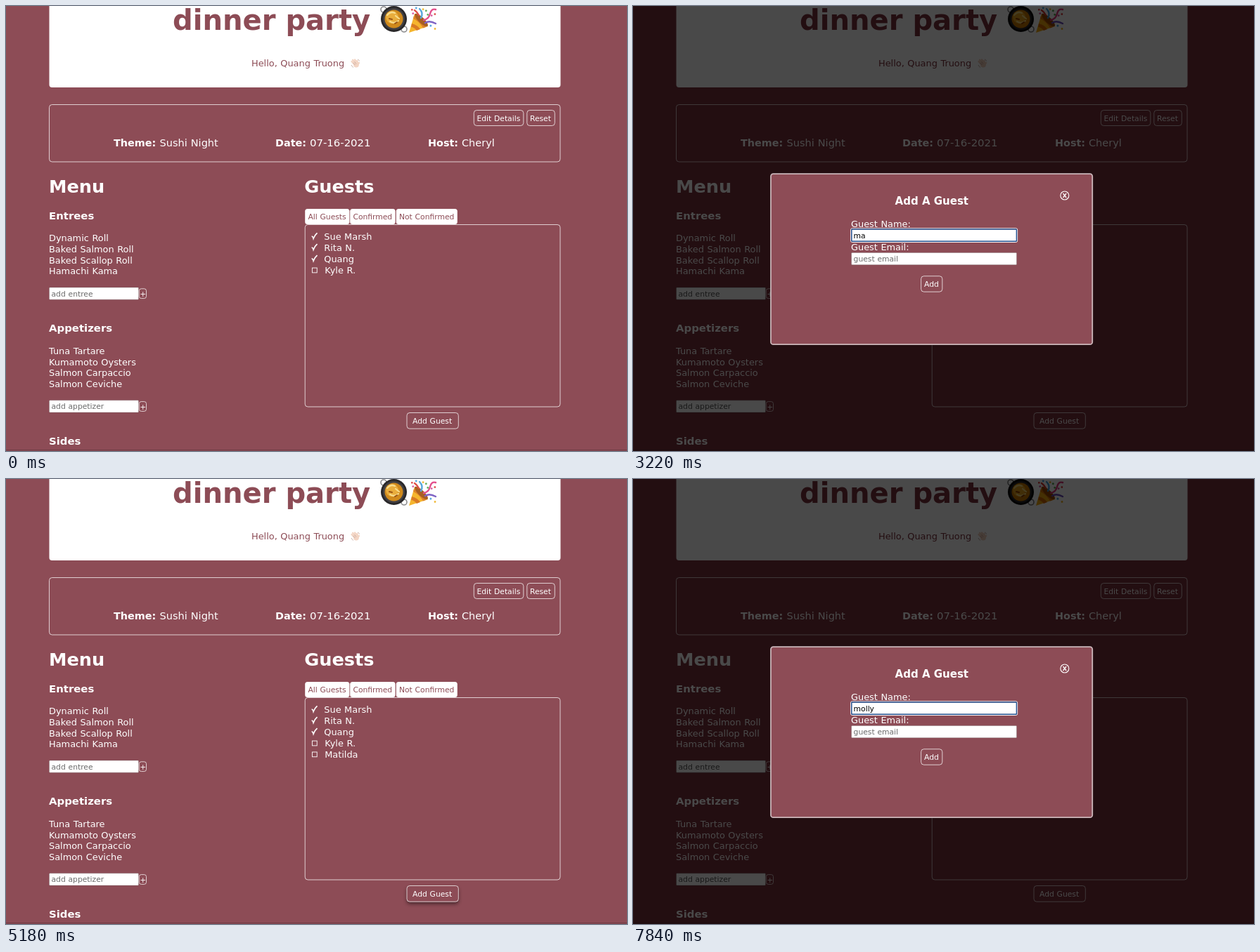
These frames come from a looping animation (883x634 px, 8000 ms). An HTML page:

```html
<!DOCTYPE html>
<html lang="en">
<head>
<meta charset="utf-8">
<title>Dinner party planner</title>
<style>
  html, body { margin: 0; width: 100%; height: 100%; overflow: hidden; background: #8d4c56; }
  svg { display: block; width: 883px; height: 634px; }
  text { font-family: "DejaVu Sans", Verdana, sans-serif; fill: #fff; word-spacing: .034em; white-space: pre; }
  .b { font-weight: bold; word-spacing: 0; }
  .rose { fill: #8d4c56; }
  .hint { fill: #6c6c6c; }
  .ink { fill: #000; }
  .line { fill: none; stroke: #fff; stroke-opacity: .72; }
  .field { fill: #fff; stroke: #6f6468; stroke-opacity: .5; stroke-width: .7; }
  .hover { filter: drop-shadow(0 3px 2.5px rgba(0, 0, 0, .45)); }
  .hover rect { fill: #8d4c56; }
  .dim { filter: url(#dim); }
</style>
</head>
<body>
<svg viewBox="0 0 883 634">
  <filter id="dim" filterUnits="userSpaceOnUse" x="0" y="0" width="883" height="634" color-interpolation-filters="sRGB">
    <feComponentTransfer>
      <feFuncR type="linear" slope=".33" intercept="-.043"/>
      <feFuncG type="linear" slope=".33" intercept="-.043"/>
      <feFuncB type="linear" slope=".33" intercept="-.043"/>
    </feComponentTransfer>
  </filter>
  <g id="page">
    <rect width="883" height="634" fill="#8d4c56"/>
    <rect x="61.5" y="-12" width="727" height="128" rx="4" fill="#fff"/>
    <g id="pan">
      <circle cx="537" cy="5" r="4" fill="none" stroke="#8b8b8d" stroke-width="1.6"/>
      <circle cx="566" cy="33" r="4" fill="none" stroke="#8b8b8d" stroke-width="1.6"/>
      <circle cx="551.5" cy="18.5" r="18.5" fill="#29282a"/>
      <circle cx="551.5" cy="18.5" r="15.5" fill="#434144"/>
      <circle cx="551.5" cy="18.5" r="13" fill="#d08a1c"/>
      <circle cx="549" cy="16" r="9" fill="#e9ad3c"/>
      <path d="M542 13q5-6 11-3M546 22q6 4 12-1M554 14l5 4" fill="none" stroke="#f8dc8b" stroke-width="2.2" stroke-linecap="round"/>
      <path d="M545 18l4 1M553 25l3-2" stroke="#9b5515" stroke-width="2" stroke-linecap="round"/>
    </g>
    <g id="popper">
      <path d="M573 38L581 11Q593 16 600 29Z" fill="#f5b52e"/>
      <path d="M577 25Q585 27 589 33L584 35Q580 30 576 30Z" fill="#d97a24"/>
      <path d="M580 14Q592 19 597 30L593 31.500Q588 22 579 18Z" fill="#df8428"/>
      <ellipse cx="590.500" cy="20" rx="4" ry="12.500" transform="rotate(-46 590.500 20)" fill="#a85f23"/>
      <g fill="none" stroke-width="2.400" stroke-linecap="round">
        <path d="M590 17Q594 10 588 4" stroke="#5aa9dd"/>
        <path d="M594 20Q601 19 603 11T611 5" stroke="#e3508c"/>
        <path d="M596 24Q602 20 611 25" stroke="#7e63c4"/>
        <path d="M587 13Q584 8 581 6" stroke="#df5049"/>
      </g>
      <g id="confetti"></g>
    </g>
    <g id="wave">
      <g stroke="#f3d5c4" stroke-linecap="round" stroke-width="2.300">
        <path d="M496 84L491.500 79M497 82L493 76.800M499 81L496 76.500M500 81L499.300 78M498 86L502 81"/>
      </g>
      <circle cx="498" cy="83.500" r="3.900" fill="#f3d5c4"/>
      <path d="M493.500 81l3 3M495.500 79.500l2.500 3M491 84q1 2.500 3 3.500M500 76q2 .5 2.500 2.500" fill="none" stroke="#c0a49c" stroke-width=".8"/>
    </g>
    <rect class="line" x="61.5" y="140.500" width="726.500" height="81.500" rx="4"/>
    <rect class="line" x="425.200" y="311.500" width="362.800" height="259.500" rx="4"/>
  </g>
  <g id="modal">
    <rect x="196" y="239.200" width="457.200" height="243" rx="3.500" fill="#8d4c56" stroke="#cbb6ba" stroke-width="1.800"/>
    <circle cx="613.800" cy="270" r="6" fill="none" stroke="#fff" stroke-width="1.100"/>
    <path d="M611.500 267l4.600 6M616.100 267l-4.600 6" stroke="#fff" stroke-width="1.300"/>
  </g>
  <path d="M0 632.700H883" stroke="#000" stroke-opacity=".25"/>
  <path id="hand" d="M608 598V591.200q0-1.500 1.300-1.500t1.300 1.500V595q.3-.9 1.300-.8t1.100 1.100q.3-.6 1.200-.4t.9 1.100q.9-.3 1 .9v3.400q-.3 2-1.500 3.500v1.400h-5.800v-1.300q-2-2-3.700-5.400 0-1.500 1.500-1.100z" fill="#fff" stroke="#111" stroke-width=".9"/>
  <path id="arrow" d="M0 0V13.400L3.100 10.600L5.500 15.700L8 14.600L5.600 9.700H9.700Z" fill="#111" stroke="#fff" stroke-width="1.100"/>
  <path id="beam" d="M402.500 317q2.500 0 2.500 2V331q0 2-2.500 2M407.500 317q-2.500 0-2.500 2M405 331q0 2 2.500 2" fill="none" stroke="#222" stroke-width="1"/>
</svg>
<script>
const NS = 'http://www.w3.org/2000/svg';
const $ = id => document.getElementById(id);
const page = $('page'), modal = $('modal');

function add(parent, tag, attrs, text) {
  const el = document.createElementNS(NS, tag);
  for (const k in attrs) el.setAttribute(k, attrs[k]);
  if (text) el.textContent = text;
  parent.appendChild(el);
  return el;
}
const label = (parent, x, y, size, text, cls = '') =>
  add(parent, 'text', { x, y, 'font-size': size, class: cls }, text);
const box = (parent, x, y, width, height, rx, cls) =>
  add(parent, 'rect', { x, y, width, height, rx, class: cls });

const BODY = 12.9, SMALL = 10.75, HEAD = 14.9, INFO = 14.5;

function button(parent, x, y, w, h, tx, ty, text) {
  const g = add(parent, 'g', {});
  box(g, x, y, w, h, 4, 'line');
  label(g, tx, ty, SMALL, text);
  return g;
}
function field(parent, x, y, w, hint) {
  box(parent, x, y, w, 17.3, 1, 'field');
  return label(parent, x + 3, y + 12.6, SMALL, hint, 'hint');
}

// Header and details
label(page, 237, 34, 40.1, 'dinner party', 'b rose');
label(page, 349, 86.3, BODY, 'Hello, Quang Truong', 'rose');
button(page, 665.3, 148.5, 70.5, 22, 669.4, 163.6, 'Edit Details');
button(page, 740.8, 148.5, 39.5, 22, 744.9, 163.6, 'Reset');
[[153, 'Theme:', 218.5, 'Sushi Night', INFO],
 [383, 'Date:', 432, '07-16-2021', 14.9],
 [600, 'Host:', 648, 'Cheryl', INFO]].forEach(([x, key, vx, value, size]) => {
  label(page, x, 200.4, 14.4, key, 'b');
  label(page, vx, 200.4, size, value);
});

// Menu
label(page, 61, 265.6, 25.6, 'Menu', 'b');
function course(y, title, dishes, hint) {
  label(page, 61, y, HEAD, title, 'b');
  dishes.forEach((dish, i) => label(page, 61, y + 31.7 + i * 15.7, BODY, dish));
  if (!hint) return;
  field(page, 61.5, y + 97.5, 127, hint);
  box(page, 189.3, y + 99.3, 10.2, 13.8, 3, 'line');
  label(page, 190.2, y + 110.4, SMALL, '+');
}
course(303.5, 'Entrees', ['Dynamic Roll', 'Baked Salmon Roll', 'Baked Scallop Roll', 'Hamachi Kama'], 'add entree');
course(464.3, 'Appetizers', ['Tuna Tartare', 'Kumamoto Oysters', 'Salmon Carpaccio', 'Salmon Ceviche'], 'add appetizer');
course(625.4, 'Sides', []);

// Guests
label(page, 424.2, 265.6, 25.6, 'Guests', 'b');
[[425.2, 63.2, 'All Guests'], [489.2, 64.4, 'Confirmed'], [554.8, 87, 'Not Confirmed']].forEach(([x, w, text]) => {
  add(page, 'rect', { x, y: 289, width: w, height: 22, rx: 3.5, fill: '#fff' });
  label(page, x + 4.2, 304, SMALL, text, 'rose');
});
const guests = [['Sue Marsh', 1], ['Rita N.', 1], ['Quang', 1], ['Kyle R.', 0], ['Matilda', 0]].map(([name, ok], i) => {
  const y = 333 + i * 15.9;
  const g = add(page, 'g', {});
  label(g, ok ? 452.3 : 453.2, y, BODY, name);
  if (ok) add(g, 'path', { d: `M434.600 ${y - 4.5}q1.600-.8 2.500 2.800q1.800-5 5.400-8`, fill: 'none', stroke: '#fff', 'stroke-width': 1.7 });
  else add(g, 'rect', { x: 435.4, y: y - 7.6, width: 6.8, height: 6.8, fill: 'none', stroke: '#fff', 'stroke-width': .9 });
  return g;
});
const newcomer = guests[4];
const addGuest = button(page, 570, 579.5, 73.3, 22.7, 578, 595, 'Add Guest');

// Confetti
[[576, 4], [583, 1], [594, 3], [599, 6], [607, 14], [611, 13], [604, 30], [609, 34], [598, 13], [577, 10]].forEach(([x, y], i) =>
  add($('confetti'), 'rect', { x, y, width: 2.6, height: 2.6, rx: .7, transform: `rotate(${i * 37} ${x} ${y})`,
    fill: ['#e05252', '#58a7e0', '#f0b93a', '#65b065', '#d860a4'][i % 5] }));

// Dialog
label(modal, 372.6, 283.4, 15, 'Add A Guest', 'b');
label(modal, 310, 314.8, BODY, 'Guest Name:');
const nameText = field(modal, 310.6, 318, 234.9, 'guest name*');
label(modal, 310, 348.3, BODY, 'Guest Email:');
field(modal, 310.6, 351.4, 234.9, 'guest email');
button(modal, 409.6, 384.8, 30.2, 22.4, 414, 400, 'Add');
const ring = add(modal, 'g', { fill: 'none' });
add(ring, 'rect', { x: 309.6, y: 316.8, width: 237, height: 19.7, rx: 2, stroke: '#fff' });
add(ring, 'rect', { x: 310.8, y: 318, width: 234.6, height: 17.3, rx: 1, stroke: '#24508f', 'stroke-width': 1.5 });

// Timeline
const LOOP = 8000;
const typing = [
  { from: 1610, to: 4830, focus: 2590, blur: 4690, word: 'matilda', keys: [3080, 3220, 3360, 3500, 3640, 3850, 4060] },
  { from: 5600, to: LOOP, focus: 5950, blur: LOOP, word: 'molly', keys: [6650, 6720, 7000, 7140, 7280] }
];
const glide = [[1610, 607.5, 589], [1680, 590, 560], [1890, 480, 410], [2030, 415, 340]];
const show = (el, on) => { el.style.display = on ? '' : 'none'; };
const within = (t, a, b) => t >= a && t < b;

function draw(t) {
  const entry = typing.find(e => within(t, e.from, e.to));
  page.setAttribute('class', entry ? 'dim' : '');
  show(modal, entry);
  if (entry) {
    const n = entry.keys.filter(k => t >= k).length;
    nameText.textContent = n ? entry.word.slice(0, n) : 'guest name*';
    nameText.setAttribute('class', n ? 'ink' : 'hint');
    show(ring, within(t, entry.focus, entry.blur));
  }
  show(newcomer, t >= 4830);
  addGuest.setAttribute('class', within(t, 980, 1610) || within(t, 4900, 5600) ? 'hover' : '');
  show($('hand'), within(t, 980, 1610));
  show($('arrow'), within(t, 1610, 2100));
  show($('beam'), within(t, 2100, 3080));
  const at = glide.filter(p => t >= p[0]).pop() || glide[0];
  $('arrow').setAttribute('transform', `translate(${at[1]} ${at[2]})`);
}

const start = performance.now();
function tick() {
  draw((performance.now() - start) % LOOP);
  requestAnimationFrame(tick);
}
draw(0);
requestAnimationFrame(tick);
</script>
</body>
</html>
```
